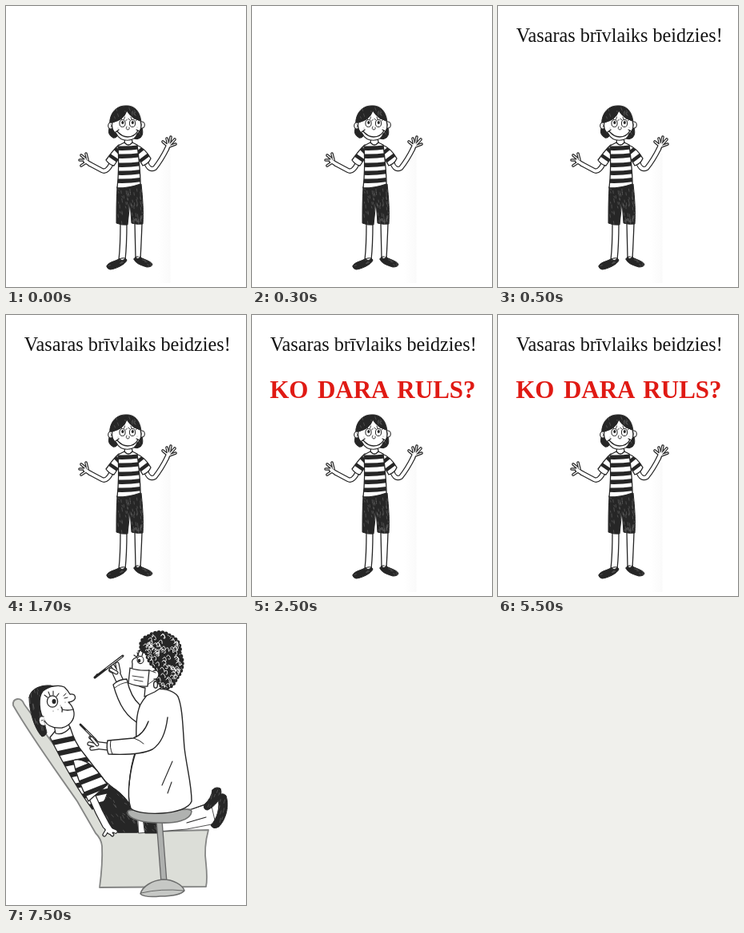
Write an HTML page that moves like this. It is 300 px wide and 352 px high and loops after 8000 ms.

```html
<!DOCTYPE html>
<html lang="lv">
<head>
<meta charset="utf-8">
<style>
html, body { margin: 0; width: 100%; height: 100%; overflow: hidden; background: #fff; }
svg { display: block; width: 100vw; height: 100vh; }
text { font-family: "Liberation Serif", "Times New Roman", serif; font-kerning: normal; white-space: pre; }
</style>
</head>
<body>
<svg id="stage" viewBox="0 0 300 352" xmlns="http://www.w3.org/2000/svg">
  <defs>
    <linearGradient id="paper"><stop offset="0" stop-color="#fff"/><stop offset="1" stop-color="#fafafa"/></linearGradient>
  </defs>
  <g id="kid"></g>
  <text id="line1" x="22.8" y="44.6" font-size="24.2" fill="#111">Vasaras brīvlaiks beidzies!</text>
  <text id="line2" x="22.2" y="103.5" font-size="31" font-weight="bold" word-spacing="3.8" fill="#e01a14">KO DARA RULS?</text>
  <g id="visit"></g>
</svg>
<script>
const INK = '#262626';
const $ = id => document.getElementById(id);

let seed = 7;
const rnd = () => (seed = seed * 16807 % 2147483647) / 2147483647;
const f = v => v.toFixed(1);

const shape = (d, fill = '#fff', w = 1.3, stroke = INK, extra = '') =>
  `<path d="${d}" fill="${fill}" stroke="${stroke}" stroke-width="${w}" stroke-linecap="round" stroke-linejoin="round" ${extra}/>`;
const line = (d, w = 1.3) => shape(d, 'none', w);
const dot = (x, y, rx, ry = rx, fill = INK, w = 0) =>
  `<ellipse cx="${x}" cy="${y}" rx="${rx}" ry="${ry}" fill="${fill}" stroke="${INK}" stroke-width="${w}"/>`;

// Outlined limbs: every [path, width] in ink, then again thinner in white.
const tubes = (parts, edge = 1.2) =>
  parts.map(([d, w]) => line(d, w + edge)).join('') +
  parts.map(([d, w]) => shape(d, 'none', w - edge, '#fff')).join('');

const clipped = (id, d, inner) =>
  `<clipPath id="${id}"><path d="${d}"/></clipPath><g clip-path="url(#${id})">${inner}</g>`;

// Marker-filled area with a few pale gaps between strokes.
function marker(id, d, [x, y, w, h], n, dx = 1, dy = 4) {
  let gaps = '';
  for (let i = 0; i < n; i++)
    gaps += `M${f(x + rnd() * w)} ${f(y + rnd() * h)}l${f(dx * (0.5 + rnd()))} ${f(dy * (0.5 + rnd()))}`;
  return shape(d, INK, 1) + clipped(id, d, shape(gaps, 'none', 0.5, '#777'));
}

function kid() {
  const shirt = 'M140 175L148 171Q153 175 158 171L164 174C166 190 168 208 168 223Q154 228 139 228C141 210 141 192 140 175Z';
  const sleeveL = 'M141 174C135 179 130 186 125 193Q129 199 135 200L141 191Z';
  const sleeveR = 'M163 174C171 177 177 184 181 191Q178 198 171 200L165 190Z';
  const bands = [177, 187, 198, 208, 218].map(y => line(`M136 ${y + 1}Q154 ${y + 2} 172 ${y - 1}`, 5.4)).join('');
  const eye = x => dot(x, 147, 3.6, 4.5, '#fff', 1) + dot(x + 0.3, 146, 1.6, 2) +
    line(`M${x - 3} 143l-2-2M${x - 1} 142l-1-3M${x + 2} 142l1-3M${x + 4} 144l2-2`, 0.9);
  return '<rect x="190" y="185" width="15.5" height="162" fill="url(#paper)"/>' +
    // legs and shoes
    shape('M143 272Q143 300 141 318L149 318Q151 300 151 272Z') + shape('M161 272L162 316L168 316Q169 300 170 272Z') +
    marker('shoeL', 'M126 326C127 321 136 320 141 317Q149 314 151 318C150 324 135 330 130 330Q126 329 126 326Z', [128, 318, 20, 8], 6, 3, -1) +
    marker('shoeR', 'M160 317Q162 312 168 315C174 318 182 320 183 324Q182 327 176 327C169 325 161 322 160 317Z', [162, 315, 20, 10], 6, 3, 1) +
    shape('M142 317Q146 321 149 316') + shape('M162 315Q165 319 168 314') +
    marker('shorts', 'M139 227Q154 228 169 223C171 242 172 258 171 273Q164 274 157 272L155 245L152 274Q145 275 138 272C138 257 138 242 139 227Z', [138, 228, 34, 43], 70, 0.5, 3) +
    // arms and hands
    tubes([['M132 197Q126 209 120 206L105 198', 5.2], ['M105 198L99 194', 5], ['M100 196L94 200', 2.6],
           ['M99 193L92 193', 2.4], ['M100 192L94 187', 2.4], ['M102 193L100 185', 2.4]]) +
    tubes([['M175 196Q179 207 186 203Q194 193 201 179', 5.2], ['M201 179L203 174', 5], ['M202 175L196 170', 2.4],
           ['M203 174L201 166', 2.4], ['M204 174L206 164', 2.4], ['M204 175L211 167', 2.4], ['M204 176L212 173', 2.4]]) +
    // shirt
    shape(sleeveL) + clipped('slL', sleeveL, line('M134 176L144 186M128 186L141 195', 4.5)) +
    shape(sleeveR) + clipped('slR', sleeveR, line('M174 176L162 186M180 185L164 197', 4.5)) +
    shape(shirt) + clipped('torso', shirt, bands) +
    shape('M148 171Q153 177 158 171L157 165L149 165Z') +
    // head
    marker('bob', 'M134 165C128 162 127 157 130 151C128 136 137 125 149 125C162 124 168 134 169 146C170 154 173 160 168 165Q164 168 160 166L150 150L139 163Q137 166 134 165Z', [130, 127, 38, 36], 24, 1, 3) +
    dot(131, 150, 3.3, 4, '#fff', 1.1) + dot(170, 149, 3.3, 4, '#fff', 1.1) +
    shape('M133 146C141 144 148 140 151 131C156 139 161 142 168 144C170 151 168 157 164 160C161 171 143 171 138 160C133 157 132 151 133 146Z', '#fff', 1.1) +
    eye(145.5) + eye(158) +
    line('M151 151Q149 154 152 155Q155 155 154 152', 0.9) +
    line('M139 157Q145 164 152 164Q161 164 165 156M137 158L141 155M163 155L167 157', 1.3) +
    line('M131 148Q133 150 131 152M170 147Q168 150 170 151', 0.7) +
    dot(140, 153, 0.4) + dot(164, 152, 0.4);
}

// Dark mass with a knobbly rim and light gaps between the curls.
function curls() {
  const d = 'M171 33C165 26 171 16 179 15C186 9 198 9 205 15C214 18 219 27 217 36C223 48 220 60 213 68C209 78 202 83 195 78C189 73 187 64 188 54C181 52 177 43 176 37Z';
  let gaps = '';
  for (let i = 0; i < 130; i++)
    gaps += `M${f(167 + rnd() * 54)} ${f(11 + rnd() * 70)}q${f(1 + rnd() * 3)} -4 4 0t${f(rnd() * 3 - 2)} 3`;
  return shape(d, INK, 1) + shape(d, 'none', 5, INK, 'stroke-dasharray="0 4.6"') +
    clipped('hair', d, shape(gaps, 'none', 0.9, '#fff'));
}

function visit() {
  const body = 'M55 142L64 131L80 129C84 142 90 154 97 162L124 197L145 215L108 232C88 206 70 172 55 142Z';
  let bands = '';
  for (let i = 0; i < 7; i++)
    bands += line(`M${f(48 + i * 8.5)} ${f(151 + i * 13.2)}l56 -12`, 6.4);
  const sleeve = 'M84 171C94 167 106 175 114 184L127 201L103 222C95 207 88 191 84 171Z';
  return '<rect width="300" height="352" fill="#fff"/>' +
    // chair
    shape('M9 102Q8 95 14 94Q20 93 23 101L132 250L140 261L253 258Q247 280 250 300Q252 320 250 329L117 330Q121 300 120 278Q119 269 112 262L89 222C60 180 32 142 9 102Z', '#dcded8', 1.8, '#858685') +
    // legs and shoes
    shape('M165 236L232 232L256 224L262 250L226 257L166 262Z', '#fff', 0.8) +
    line('M226 249L250 242M232 232L257 223', 1.2) +
    marker('toeA', 'M258 208Q262 203 268 206C272 216 262 228 252 233Q246 233 248 226Q257 218 258 208Z', [249, 207, 18, 22], 10, -1, 4) +
    marker('toeB', 'M265 216Q270 210 275 215C280 231 273 247 266 254Q259 258 256 252C264 244 268 230 265 216Z', [258, 214, 18, 36], 14, -1, 4) +
    // patient
    marker('hem', 'M171 240L195 240L195 262L174 262Z', [172, 242, 22, 18], 10, 2, 3) +
    marker('pants', 'M108 228L125 203C137 208 150 220 163 238L165 261L140 261C128 252 117 240 108 228Z', [110, 206, 52, 54], 60, 2, 3) +
    shape(body) + clipped('trunk', body, bands) +
    marker('lap', 'M112 233Q128 221 128 202C142 208 154 222 163 238L164 261L140 261C129 253 120 243 112 233Z', [112, 206, 50, 54], 45, 2, 3) +
    tubes([['M108 217Q116 236 125 252', 9], ['M126 253L130 259', 8.4], ['M130 257L137 260', 4.4], ['M126 259L123 264', 4], ['M130 261L133 264', 3.6]]) +
    shape(sleeve) + clipped('cuff', sleeve, line('M80 187L114 173M87 201L126 186M94 215L132 200', 6)) +
    shape('M60 126L62 137Q71 140 80 130L77 122Z') +
    marker('mop', 'M29 92C30 82 42 76 56 77L62 79L49 90L44 104L48 124L51 136Q49 141 45 141C37 133 29 112 29 92Z', [29, 79, 22, 58], 28, 1, 5) +
    shape('M46 84C54 77 67 76 73 79C77 83 79 86 80 88Q87 87 86.500 93Q85 97 78 98Q84 103 85 111C86 120 79 128 70 130C60 131 52 128 48 121C41 110 40 92 46 84Z') +
    shape('M47 116Q41 114 41 121Q42 129 49 127') + line('M44 121Q47 119 48 123', 0.8) +
    dot(58, 97, 6.6, 7.2, '#fff', 1.2) + dot(60, 97, 2.5, 3) +
    line('M52 92L48 89M55 90L53 85M59 89L59 84M63 91L66 87', 1.1) +
    line('M72 90L75 87M73 93L77 92', 1) +
    line('M70 107Q77 109 84 107M69 104Q71 106 70 110', 1.3) +
    [[68, 102], [65, 107], [74, 98], [59, 109]].map(([x, y]) => dot(x, y, 0.5)).join('') +
    // stool
    shape('M188 246L195 246L201 324L194 324Z', '#aeb0ae', 1.3, '#666') +
    shape('M168 338C170 329 183 321 196 320C209 320 221 327 223 334Q217 341 193 341Q173 343 168 338Z', '#c6c8c5', 1.5, '#6d6e6d') +
    line('M169 337Q194 331 222 334', 0.6) +
    shape('M152 235C154 230 174 235 193 235C214 234 231 229 232 235C231 246 211 250 192 249C173 249 152 245 152 235Z', '#b0b2b0', 1.6, '#6d6e6d') +
    // raised arm
    tubes([['M143 73L138 62', 9], ['M139 62L131 58', 4.4], ['M138 60L133 52', 4.2], ['M141 60L139 50', 4.2]]) +
    line('M111 67L146 40', 3) + shape('M125 56L145 41', 'none', 0.9, '#fff') + line('M111 67L114 63', 2) +
    tubes([['M138 61L131 57', 3.8]]) +
    shape('M134 76Q141 69 151 69C154 83 159 94 167 101L170 127C150 117 141 101 134 76Z') +
    line('M136 80Q143 74 152 73', 0.9) +
    // coat
    shape('M184 82C194 80 209 82 215 91C221 105 221 132 223 155C226 181 232 200 232 222C226 240 166 241 156 231C150 214 155 182 163 158C163 139 161 116 168 101Q174 90 184 82Z', '#fff', 1.4) +
    line('M208 172L195 202M207 198L202 212M163 156Q155 178 154 202', 1.1) +
    // lower arm
    tubes([['M131 154L114 152', 9], ['M115 150L106 142', 4.2], ['M113 152L104 150', 4.2], ['M114 155L107 156', 4.2]]) +
    line('M93 126L112 145', 2.8) + shape('M100 133L111 144', 'none', 0.8, '#fff') +
    tubes([['M114 151L107 143', 3.6]]) +
    shape('M178 122C174 133 168 140 159 143L127 146Q125 155 128 163C149 164 171 163 183 157C194 150 200 134 202 117', '#fff', 1.4) +
    line('M131 146Q129 154 133 163M160 143Q168 146 172 150', 1) +
    // dentist's head
    shape('M169 31C164 37 165 40 163 42Q156 44 158 50L157 65Q162 79 174 80L173 91L186 85L198 77L193 42Z') +
    curls() +
    shape('M184 59Q190 56 191 63Q190 70 185 69') +
    dot(168, 45, 4, 4.6, '#fff', 1.1) + dot(166.5, 46, 1.8, 2.2) +
    line('M164 42L160 39M166 40L164 36M170 40L171 36M165 34Q170 31 175 35', 1.2) +
    shape('M155 55Q166 59 179 58L177 78Q165 79 153 74Z') +
    line('M179 58L187 61M177 76L187 69M158 65L172 67M160 70L171 72', 0.9) +
    dot(187, 76, 2.4, 4.2, '#fff', 1.4);
}

$('kid').innerHTML = kid();
$('visit').innerHTML = visit();

const LOOP = 8000;
const spans = { kid: [0, 7500], line1: [500, 7500], line2: [2500, 7500], visit: [7500, LOOP] };

function draw(t) {
  for (const id in spans) {
    const [from, to] = spans[id];
    $(id).style.display = t >= from && t < to ? '' : 'none';
  }
}

const start = performance.now();
function tick() {
  draw((performance.now() - start) % LOOP);
  requestAnimationFrame(tick);
}
tick();
</script>
</body>
</html>
```
